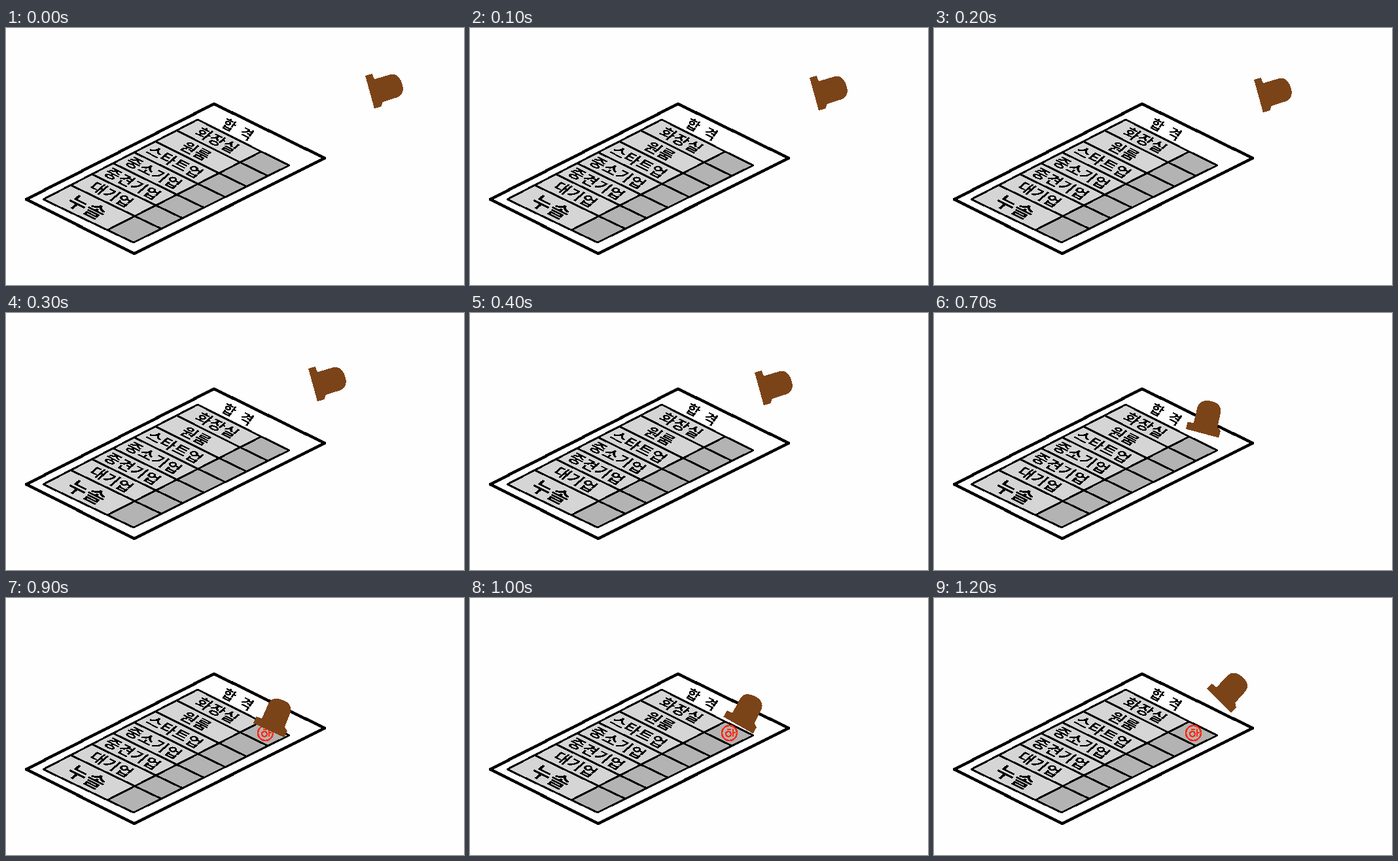
These frames come from a looping animation (700 by 393 pixels, 6200 ms). An HTML page:

```html
<!DOCTYPE html>
<html lang="ko">
<head>
<meta charset="utf-8">
<title>합격 도장</title>
<style>
  html, body { margin: 0; width: 100%; height: 100%; overflow: hidden; background: #fefefe; }
  svg { display: block; width: 100%; height: 100%; }
  text {
    font-family: "Noto Sans CJK KR", "Noto Sans CJK", "Noto Sans CJK JP", sans-serif;
    font-weight: 700;
    text-anchor: middle;
    dominant-baseline: central;
  }
</style>
</head>
<body>
<svg viewBox="0 0 700 393" shape-rendering="crispEdges" stroke-linejoin="round">
  <defs>
    <filter id="hard" filterUnits="userSpaceOnUse" x="0" y="0" width="700" height="393">
      <feComponentTransfer><feFuncA type="discrete" tableValues="0 1"/></feComponentTransfer>
    </filter>
  </defs>
  <path d="M318 116L487 199L196 345L31 262Z" fill="#fefefe" stroke="#000" stroke-width="4.500"/>
  <g id="table" stroke="#000" stroke-width="3"></g>
  <g id="labels" filter="url(#hard)"></g>
  <g id="mark" fill="none" stroke="#ff2a0c" stroke-width="2.400">
    <circle cx="396.500" cy="206.500" r="11.500"/>
    <circle cx="395" cy="208" r="4"/>
    <path d="M393 201h6M402 200v12M402 206h4"/>
  </g>
  <path id="stamp" fill="#7b4318"
    d="M-26 0V-11L-17-12L-17.500-38Q-16-50 0-51Q17-52 19-38L20-15L26-11V0Z"/>
</svg>
<script>
const LOOP = 6200, STEP = 100;
const $ = id => document.getElementById(id);
const mix = (a, b, k) => a.map((v, i) => v + (b[i] - v) * k);

function add(parent, tag, attrs, content = "") {
  const el = document.createElementNS("http://www.w3.org/2000/svg", tag);
  for (const name in attrs) el.setAttribute(name, attrs[name]);
  el.textContent = content;
  parent.append(el);
}

// Text lying on the sheet
function label(text, [x, y], size, lean = "-.7 .6") {
  const transform = `matrix(.89 .45 ${lean} ${x} ${y})`;
  add($("labels"), "text", { "font-size": size, transform }, text);
}

// Long edges of the table: left side, column divider, right side
const edges = [
  [[293, 140], [57, 262]],
  [[390, 189], [155, 309]],
  [[433, 210], [195, 328]]
];
const at = (col, k) => mix(...edges[col], k);

// Rows are equally high, the last one takes the rest
const rows = ["화장실", "원룸", "스타트업", "중소기업", "중견기업", "대기업", "누솔"];
const PITCH = .137;

rows.forEach((text, r) => {
  const top = r * PITCH;
  const end = r < rows.length - 1 ? top + PITCH : 1;
  ["#d5d5d5", "#b3b3b3"].forEach((fill, c) => {
    const points = [at(c, top), at(c + 1, top), at(c + 1, end), at(c, end)].join(" ");
    add($("table"), "polygon", { points, fill });
  });
  const middle = (top + end) / 2;
  const [x, y] = mix(at(0, middle), at(1, middle), .5);
  label(text, [x - 2, y - 2], 176 * (end - top));
});
label("합\u2002격", [355, 154], 21, "-.57 .8");

// Stamp: step, x, y and angle of its base
const poses = [
  [0, 556, 98, 74.5],
  [2, 496, 104, 74.5],
  [4, 442, 116, 74.5],
  [5, 438, 154, 48],
  [7, 410, 184, 15],
  [8, 393, 210, 20],
  [10, 410, 194.5, 29.5],
  [12, 435.5, 157, 44.5]
];
const LANDED = 8, LAST = 12;

function draw(time) {
  const step = Math.min(LAST, Math.floor(time % LOOP / STEP));
  const i = Math.max(1, poses.findIndex(p => p[0] >= step));
  const a = poses[i - 1], b = poses[i];
  const [, x, y, angle] = mix(a, b, (step - a[0]) / (b[0] - a[0]));
  $("stamp").setAttribute("transform", `translate(${x} ${y}) rotate(${angle})`);
  $("mark").setAttribute("visibility", step > LANDED ? "visible" : "hidden");
}

const start = performance.now();
function tick() {
  draw(performance.now() - start);
  requestAnimationFrame(tick);
}
tick();
</script>
</body>
</html>
```
